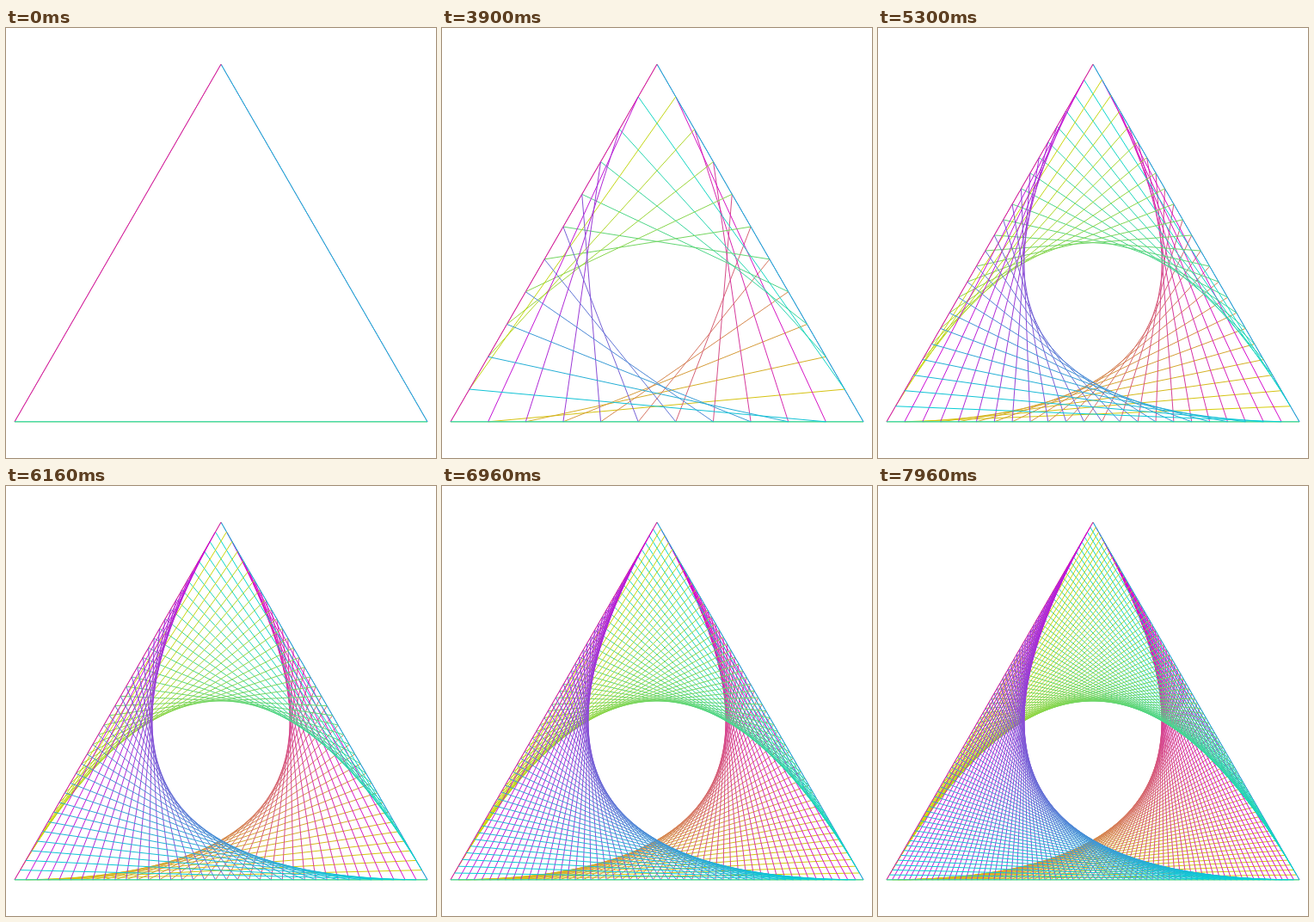
An HTML page with a canvas for the animation above (8000 ms loop, 500x500 px).

```html
<!DOCTYPE html>
<html lang="en">
<head>
<meta charset="utf-8">
<title>Triangle envelope</title>
<style>
  html, body { margin: 0; width: 100%; height: 100%; overflow: hidden; background: #fff; }
  canvas { display: block; }
</style>
</head>
<body>
<canvas id="stage" width="500" height="500"></canvas>
<script>
const ctx = document.getElementById('stage').getContext('2d');
const LOOP = 8000;
const HALF = 240;
const RISE = HALF * Math.sqrt(3) / 2;
const TOP = [250, 250 - RISE], LEFT = [250 - HALF, 250 + RISE], RIGHT = [250 + HALF, 250 + RISE];
const LEVEL = 214;
const CYAN = [0, LEVEL, LEVEL], MAGENTA = [LEVEL, 0, LEVEL], YELLOW = [LEVEL, LEVEL, 0];

// Each family slides a chord along two neighbouring sides, a -> b and b -> c.
const FAMILIES = [
  { path: [LEFT, RIGHT, TOP], from: YELLOW, to: MAGENTA },
  { path: [RIGHT, TOP, LEFT], from: CYAN, to: YELLOW },
  { path: [TOP, LEFT, RIGHT], from: MAGENTA, to: CYAN },
];

// Hold times in ms; every later step lasts 100 ms.
const HOLDS = [1000, 500, 420, 370, 330, 300, 270, 250, 240, 220, 210, 200, 190, 180,
  170, 160, 150, 140, 140, 130, 130, 120, 120, 110, 110];

const mix = (a, b, t) => a.map((v, i) => v + (b[i] - v) * t);

function stepAt(time) {
  let step = 0;
  while (time >= (HOLDS[step] ?? 100)) time -= HOLDS[step++] ?? 100;
  return step;
}

const divisions = step => step < 15 ? step + 1 : 2 * step - 13;

function draw(count) {
  ctx.fillStyle = '#fff';
  ctx.fillRect(0, 0, 500, 500);
  ctx.lineWidth = 1;
  for (const { path: [a, b, c], from, to } of FAMILIES) {
    for (let k = 0; k <= count; k++) {
      const t = k / count;
      ctx.strokeStyle = `rgb(${mix(from, to, t).map(Math.round)})`;
      ctx.beginPath();
      ctx.moveTo(...mix(a, b, t));
      ctx.lineTo(...mix(b, c, t));
      ctx.stroke();
    }
  }
}

const start = performance.now();
let shown = -1;
function tick() {
  const step = stepAt((performance.now() - start) % LOOP);
  if (step !== shown) draw(divisions(shown = step));
  requestAnimationFrame(tick);
}
tick();
</script>
</body>
</html>
```
